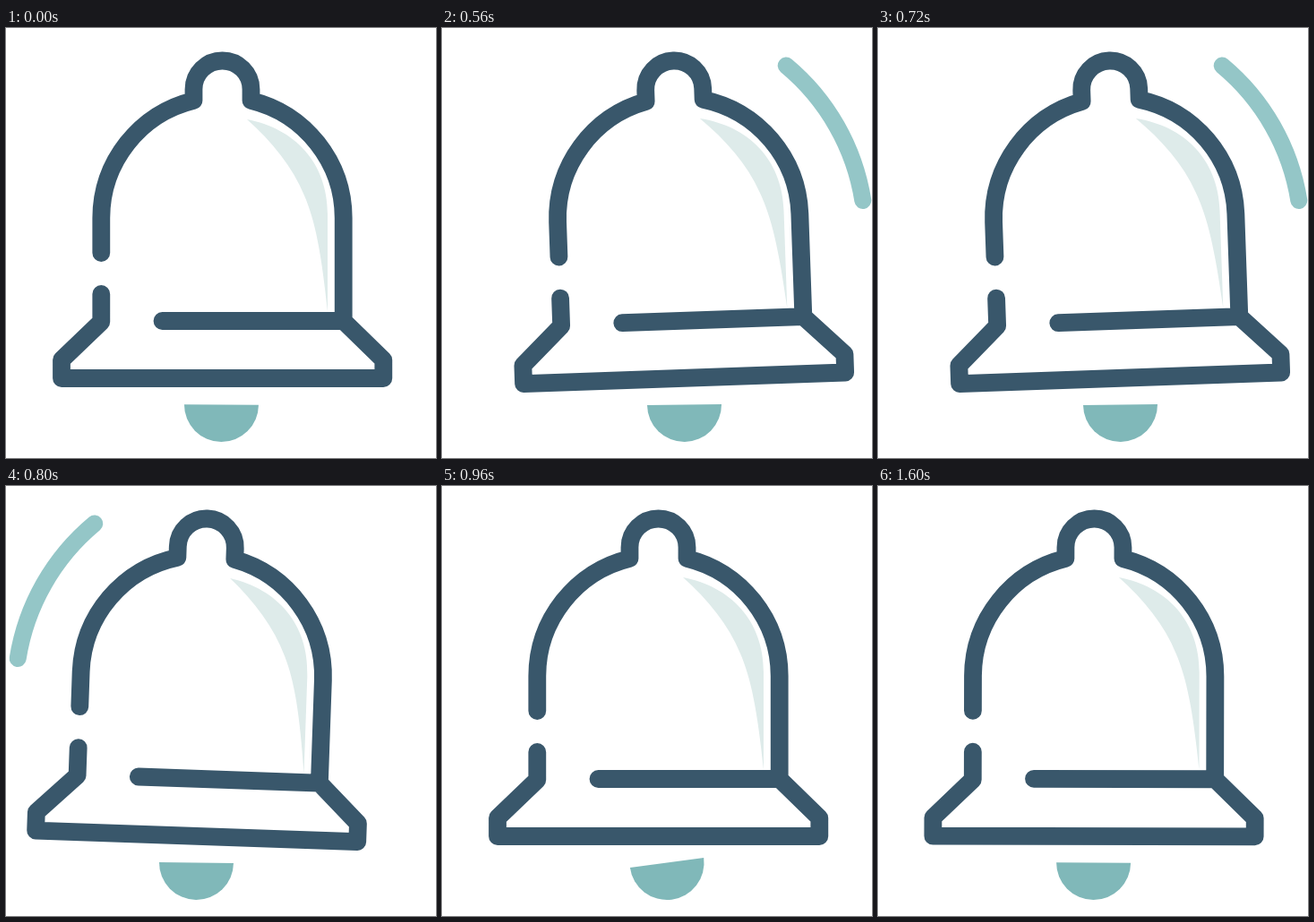
Write an HTML page with a canvas that moves like this. It is 480x480 px and loops after 1.68 s.

```html
<!DOCTYPE html>
<html lang="en">
<head>
<meta charset="utf-8">
<title>Ringing bell</title>
<style>
html, body { margin: 0; width: 100%; height: 100%; overflow: hidden; background: #fff; }
canvas { display: block; width: 480px; height: 480px; }
</style>
</head>
<body>
<canvas id="stage" width="480" height="480"></canvas>
<script>
const ctx = document.getElementById('stage').getContext('2d');
const STEP = 80, STEPS = 21;
const CENTER = 241.5, KNOB_Y = 36.5;
const rad = deg => deg * Math.PI / 180;

const outline = new Path2D(
  'M106.3 251V212A135.3 135.3 0 0 1 209.5 81V68.5A32 32 0 0 1 273.5 68.5V81' +
  'A135.3 135.3 0 0 1 376.7 212V327L421.3 370.5V391H62V370.5L106.3 328V297' +
  'M174.5 327H376.7');
const shine = new Path2D(
  'M269 102C322 112 359 150 359 208V317C352 250 345 215 333 187C320 155 297 127 269 102Z');
const wave = new Path2D('M98.8 42A246 246 0 0 0 13.2 192.5');

ctx.lineCap = ctx.lineJoin = 'round';

function line(path, color, width) {
  ctx.strokeStyle = color;
  ctx.lineWidth = width;
  ctx.stroke(path);
}

function bell(angle, shift = 0) {
  ctx.save();
  ctx.translate(CENTER + shift, KNOB_Y);
  ctx.rotate(rad(angle));
  ctx.translate(-CENTER, -KNOB_Y);
  ctx.fillStyle = '#deebea';
  ctx.fill(shine);
  line(outline, '#39576b', 19.8);
  ctx.restore();
}

function clapper(angle, x = 241 - 77 * Math.sin(rad(angle))) {
  ctx.save();
  ctx.translate(x, 420.5);
  ctx.rotate(rad(angle));
  ctx.fillStyle = '#80b8b9';
  ctx.beginPath();
  ctx.arc(0, 0, 41.5, 0, Math.PI);
  ctx.fill();
  ctx.restore();
}

// Tilted pose with its sound wave; the right side mirrors the left.
function ring(side) {
  bell(-2 * side, 16.6 * side);
  clapper(-0.8 * side, CENTER + 29 * side);
  ctx.save();
  if (side > 0) {
    ctx.translate(2 * CENTER, 0);
    ctx.scale(-1, 1);
  }
  line(wave, '#94c6c7', 19);
  ctx.restore();
}

function draw(step) {
  ctx.clearRect(0, 0, 480, 480);
  if (step >= 7 && step <= 11) {
    ring(step % 2 ? 1 : -1);
  } else if (step < 7) {
    bell(0);
    clapper(0.4 + 0.12 * step);
  } else {
    // The clapper settles quickly, then the whole bell drifts slightly.
    const settle = Math.max(0, 1 - (step - 12) / 3);
    const drift = Math.max(0, (step - 15) / 5);
    bell(0.1 * drift);
    clapper(0.9 - 8.4 * settle * settle - 0.6 * drift);
  }
}

function frame(now) {
  draw(Math.floor(now / STEP) % STEPS);
  requestAnimationFrame(frame);
}
draw(0);
requestAnimationFrame(frame);
</script>
</body>
</html>
```
